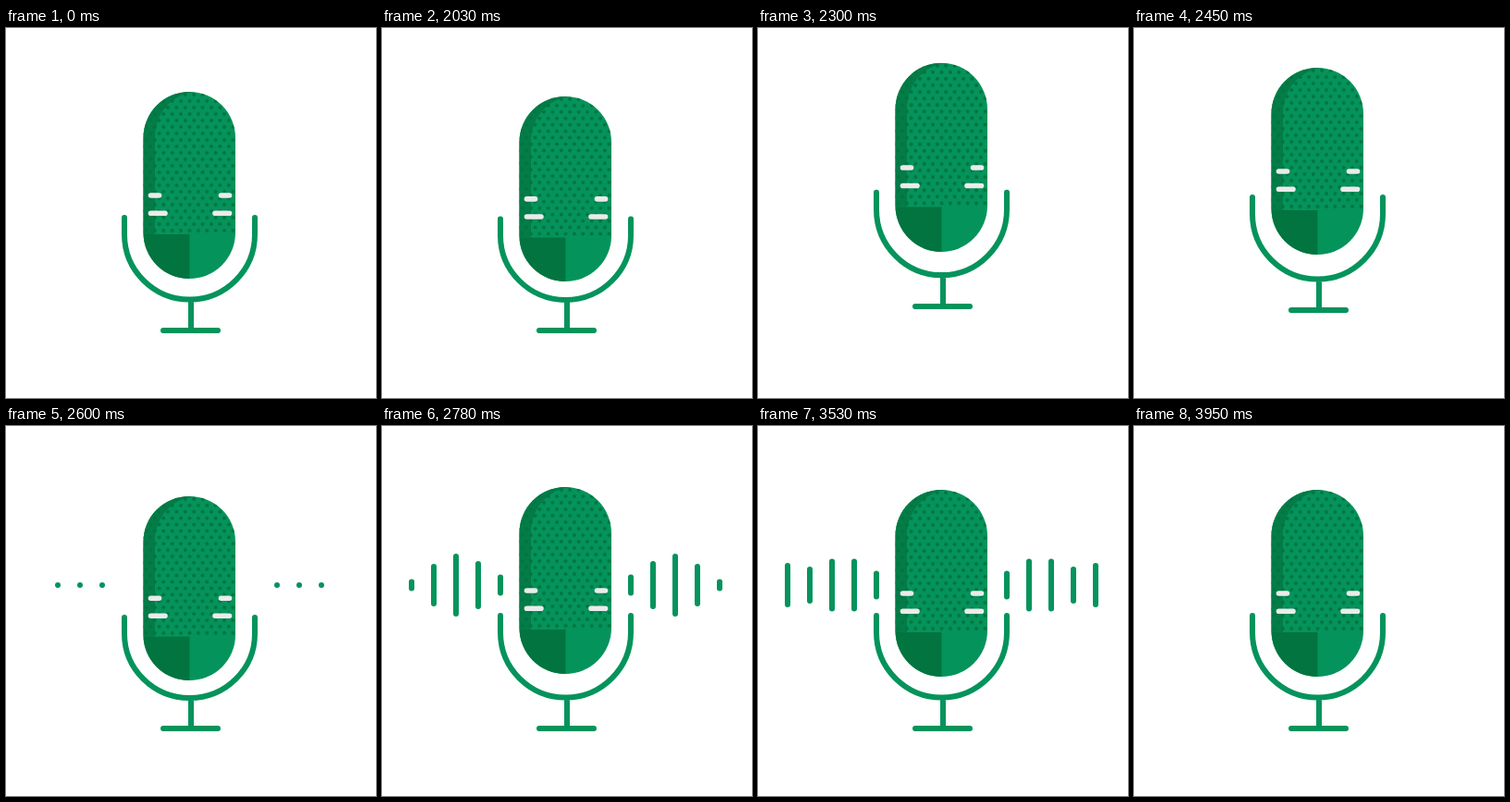
Recreate the animation shown at these times as an HTML page. Size 400 by 400 pixels, loop 3980 ms.

```html
<!DOCTYPE html>
<html>
<head>
<meta charset="utf-8">
<style>
  html, body { margin: 0; height: 100%; overflow: hidden; background: #fff; }
  svg { display: block; width: 100vw; height: 100vh; }
  .line { fill: none; stroke: #05935c; stroke-width: 6; stroke-linecap: round; stroke-linejoin: round; }
  .grip { fill: none; stroke: #ebebeb; stroke-width: 5.6; stroke-linecap: round; }
</style>
</head>
<body>
<svg viewBox="0 0 400 400">
  <defs>
    <clipPath id="capsule"><rect x="148.5" y="69" width="99.5" height="202" rx="49.75"/></clipPath>
    <pattern id="mesh" x="193.8" y="215.5" width="9.4" height="14" patternUnits="userSpaceOnUse">
      <g fill="#02743f">
        <circle cx="4.7" cy="3.5" r="2"/>
        <circle cx="0" cy="10.5" r="2"/>
        <circle cx="9.4" cy="10.5" r="2"/>
      </g>
    </pattern>
  </defs>
  <g id="bars" class="line"></g>
  <g id="stand" class="line">
    <path d="M128 205V223A70.5 70.5 0 0 0 269 223V205M200 294V327M170 327H229"/>
  </g>
  <g id="body">
    <g clip-path="url(#capsule)">
      <rect x="148" y="69" width="101" height="203" fill="#05935c"/>
      <path d="M148 69H204C178 72 161 93 161 119V223H148Z" fill="#037c47"/>
      <rect x="148" y="69" width="101" height="154" fill="url(#mesh)"/>
      <rect x="148" y="223" width="50.5" height="49" fill="#02743f"/>
    </g>
    <path class="grip" d="M156.5 181H165.5M232.5 181H241.5M156.5 200.3H172M226 200.3H241.5"/>
  </g>
</svg>
<script>
const LOOP = 3980, START = 2030, STEP = 30, BAR_Y = 172;

// Each key: time, then offsets of the top and bottom edges
const bodyKeys = [
  [2000, 0, 0], [2030, 5, 3], [2080, 9, 5], [2130, 3, 2], [2210, -13, -10],
  [2335, -34, -32], [2450, -26, -26], [2540, -6, -6], [2600, 7, 4],
  [2690, 0, 0], [2780, -3, -3], [2930, 1, 1], [3110, 2, 2.5],
  [3320, 1, 1], [3530, 0, 0], [3980, 0, 0]
];
const standKeys = [
  [2000, 0, 0], [2030, 1.5, 0], [2080, 4, 0], [2130, -1, 0], [2210, -16.5, -14],
  [2340, -29, -28], [2450, -22, -22], [2540, -7, -7], [2590, 2, 0],
  [2660, 0, 0], [3980, 0, 0]
];
// Each key: time, then half lengths from the outer bar to the inner one
const barKeys = [
  [2570, 0, 0, 0, 0, 0], [2780, 6.5, 23, 34, 26, 11.5],
  [3080, 26, 42, 62, 44, 21], [3300, 14, 30, 42, 34, 17],
  [3530, 24, 20, 28.5, 28.5, 15.5], [3740, 32, 54, 81, 52, 22],
  [3950, 0, 0, 0, 0, 0]
];

function slope(keys, i, c) {
  const a = keys[i - 1], b = keys[i + 1], k = keys[i];
  if (!a || !b || (k[c] - a[c]) * (b[c] - k[c]) <= 0) return 0;
  return (b[c] - a[c]) / (b[0] - a[0]);
}

// Smooth curve through the keys, resting at each turning point
function sample(keys, t) {
  const last = keys.length - 1;
  if (t <= keys[0][0]) return keys[0].slice(1);
  if (t >= keys[last][0]) return keys[last].slice(1);
  const i = keys.findIndex(k => k[0] > t) - 1;
  const a = keys[i], b = keys[i + 1], d = b[0] - a[0], u = (t - a[0]) / d;
  return a.slice(1).map((p, n) => {
    const c = n + 1;
    return (2 * u ** 3 - 3 * u * u + 1) * p + (3 * u * u - 2 * u ** 3) * b[c] +
      d * (u * (1 - u) ** 2 * slope(keys, i, c) + u * u * (u - 1) * slope(keys, i + 1, c));
  });
}

function stretch(el, top, bottom, [up, down]) {
  const s = (bottom + down - top - up) / (bottom - top);
  el.setAttribute("transform", `matrix(1 0 0 ${s} 0 ${top + up - top * s})`);
}

const [bars, stand, body] = ["bars", "stand", "body"].map(id => document.getElementById(id));

function barPath(halves) {
  return halves.map((h, i) => {
    if (h <= 0.5) return "";
    const r = Math.max(h - 3, 0.01);
    return [32 + 24 * i, 365 - 24 * i].map(x => `M${x} ${BAR_Y - r}v${2 * r}`).join("");
  }).join("");
}

const wave = document.createElementNS("http://www.w3.org/2000/svg", "path");
bars.append(wave);

function draw() {
  let t = performance.now() % LOOP;
  t = t < START ? 0 : START + Math.floor((t - START) / STEP) * STEP;
  stretch(body, 69, 271, sample(bodyKeys, t));
  stretch(stand, 202, 330, sample(standKeys, t));
  wave.setAttribute("d", barPath(sample(barKeys, t)));
  requestAnimationFrame(draw);
}
draw();
</script>
</body>
</html>
```
